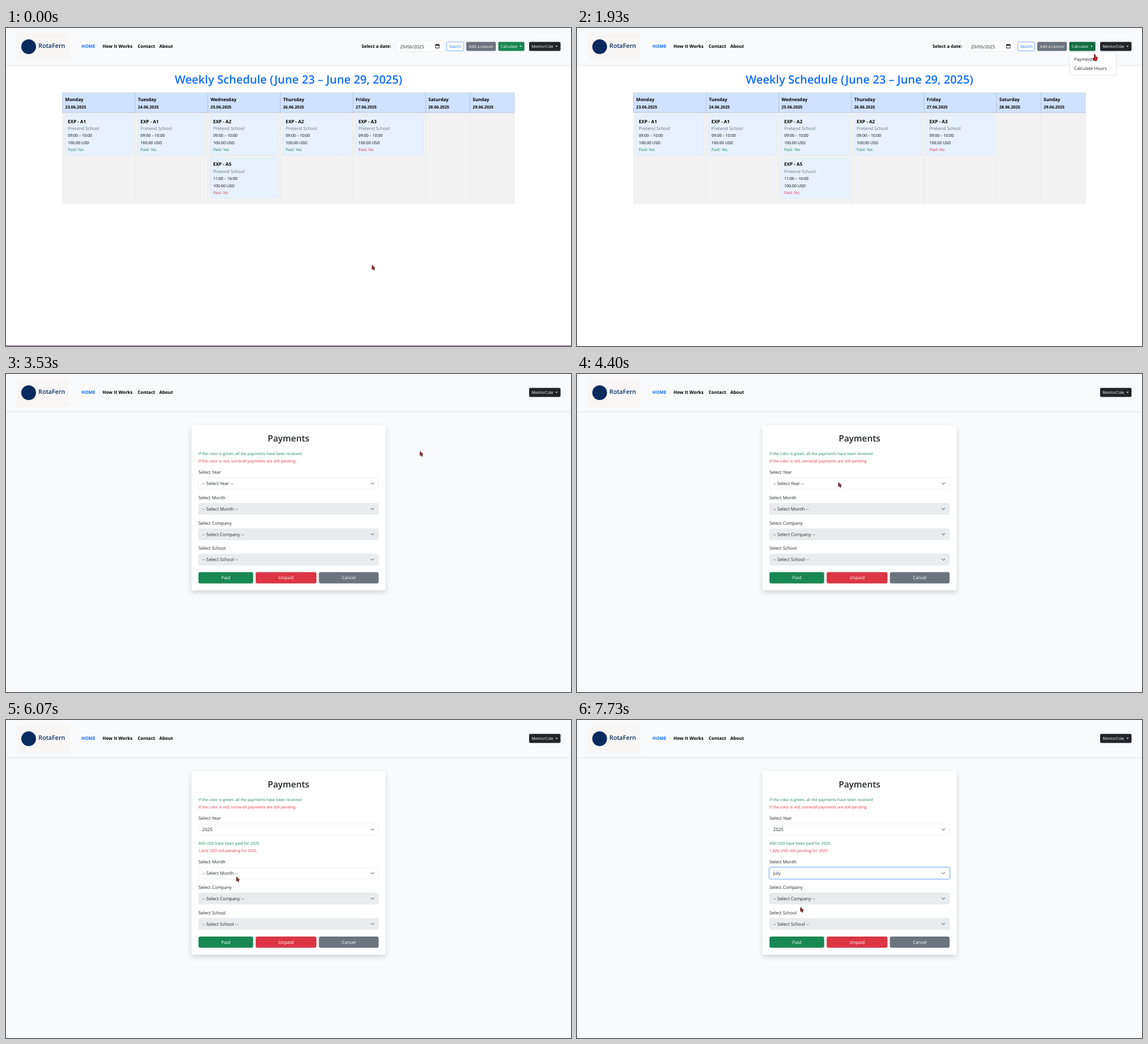
Write an HTML page that moves like this. It is 998x561 px and loops after 8000 ms.

```html
<!DOCTYPE html>
<html lang="en">
<head>
<meta charset="utf-8">
<title>Weekly schedule and payments</title>
<style>
html, body { margin: 0; width: 100%; height: 100%; overflow: hidden; background: #fff; }
svg { display: block; width: 998px; height: 561px; }
text { font-family: "Open Sans", "Noto Sans", sans-serif; text-rendering: geometricPrecision; white-space: pre; }
#bar { filter: drop-shadow(0 1px 1px rgba(0,0,0,.1)); }
.card { filter: drop-shadow(0 4px 4px rgba(0,0,0,.15)); }
</style>
</head>
<body>
<svg id="stage" viewBox="0 0 998 561" xmlns="http://www.w3.org/2000/svg"></svg>
<script>
const LOOP = 8000, ROW = 16.3;
const BLUE = '#0d6efd', GREEN = '#198754', RED = '#dc3545', GREY = '#6c757d', INK = '#212529', LINE = '#dee2e6', PALE = '#f9fafc';
const BODY = 7.87, SMALL = 6.92;

// y is the middle of the capitals
const text = (x, y, s, size = BODY, fill = INK, weight = 400, anchor = 'start', id = '') =>
  `<text ${id && `id="${id}"`} x="${x}" y="${(y + size * .357).toFixed(2)}" font-size="${size}" fill="${fill}" font-weight="${weight}" text-anchor="${anchor}">${s}</text>`;
const box = (x, y, w, h, fill, r = 0, stroke = 'none', extra = '') =>
  `<rect x="${x}" y="${y}" width="${w}" height="${h}" rx="${r}" fill="${fill}" stroke="${stroke}" stroke-width=".55" ${extra}/>`;
const group = (id, inner, attrs = '') => `<g id="${id}" ${attrs}>${inner}</g>`;
const caret = (x, y) => `<path d="M${x - 2} ${y - 1}h4l-2 2z" fill="#fff"/>`;
const navButton = (x, w, fill, id = '') => box(x, 24.4, w, 16.1, fill, 2.2, 'none', id && `id="${id}"`);

function navBar() {
  const links = [['HOME', 133.3, BLUE], ['How It Works', 170.5, '#000'], ['Contact', 232.4, '#000'], ['About', 270.7, '#000']];
  return group('nav',
    group('bar', box(0, 0, 998, 65.5, PALE)) +
    box(19, 8, 93, 50, '#f8f7f5') +
    '<circle cx="40" cy="33" r="13" fill="#0a2a5e"/>' +
    text(57.3, 31, 'RotaFern', 10.7, '#0a2a5e', 600) +
    links.map(([s, x, c]) => text(x, 32.5, s, 7.97, c, 700)).join('') +
    navButton(924, 55.5, INK) +
    text(928.5, 32.7, 'MentorCole', SMALL, '#fff') + caret(972.5, 32.5));
}

function lesson(x, y, code, time, paid) {
  const tx = x + 4.7;
  return box(x, y, 119.3, 71.4, '#e7f1ff', 3, '#d5e0ee') +
    text(tx, y + 11.3, code, 8.15, '#000', 700) +
    text(tx, y + 23.9, 'Pretend School', BODY, GREY) +
    text(tx, y + 36.5, time, 7, '#000') +
    text(tx, y + 49, '100.00 USD', 7.05, '#000') +
    text(tx, y + 61.5, 'Paid: ' + (paid ? 'Yes' : 'No'), 6.9, paid ? GREEN : RED);
}

function homePage() {
  const edges = [99.8, 228.2, 356.5, 484.7, 613, 741.2, 819.5, 898];
  const days = ['Monday', 'Tuesday', 'Wednesday', 'Thursday', 'Friday', 'Saturday', 'Sunday'];
  const codes = ['A1', 'A1', 'A2', 'A2', 'A3'];
  let out = text(499, 91, 'Weekly Schedule (June 23 – June 29, 2025)', 20.1, BLUE, 600, 'middle');
  days.forEach((day, i) => {
    const x = edges[i], w = edges[i + 1] - x;
    out += box(x, 149.2, w, 160.3, '#f2f2f2', 0, LINE) + box(x, 114.7, w, 34.5, '#cfe2ff', 0, '#a6b5cc') +
      text(x + 4.8, 126.2, day, 8, '#000', 700) +
      text(x + 4.8, 139, `${23 + i}.06.2025`, 7.2, '#000', 700);
    if (codes[i]) out += lesson(x + 4.7, 153.3, 'EXP - ' + codes[i], '09:00 – 10:00', i < 4);
  });
  out += lesson(edges[2] + 4.7, 229.2, 'EXP - A5', '11:00 – 16:00', false);

  out += text(628, 32.5, 'Select a date:', 7.85, '#000', 700) +
    box(689.4, 22.7, 84, 19, '#fff', 3, LINE) + text(696, 32.7, '29/06/2025', 8) +
    '<path d="M758.8 29.3h6.4v6h-6.4zM760.3 28v1.5M763.7 28v1.5" fill="none" stroke="#111" stroke-width=".9"/><path d="M758.5 29h7v2h-7z" fill="#111"/>' +
    box(778.4, 24.6, 30.2, 15.8, '#fff', 2.2, BLUE) + text(793.5, 32.7, 'Search', 6.85, BLUE, 400, 'middle') +
    navButton(813, 52.3, GREY) + text(839.2, 32.7, 'Add a Lesson', SMALL, '#fff', 400, 'middle') +
    navButton(869.5, 46.2, GREEN, 'calc') + text(873.8, 32.7, 'Calculate', SMALL, '#fff') + caret(909, 32.5);
  out += group('menu', box(869.8, 42.2, 82.6, 41.4, '#fff', 3, '#ccc') +
    text(878, 55, 'Payments') + text(878, 71.5, 'Calculate Hours'));
  out += group('status', box(0, 547, 89.5, 14, '#2b2a33') + text(5, 554, '127.0.0.1:5000/payments', 6.4, '#fff'));
  return group('home', out + '<path id="edge" d="M0 560.5H998" stroke="#8a5a90"/>');
}

function ring(id, y) {
  return group(id, box(338.9, y - 11, 320.2, 22, 'none', 4, '#c2dbfe', 'style="stroke-width:2.1"') +
    box(340, y - 9.9, 318, 19.8, 'none', 3, '#86b7fe'));
}

function field(name, y, on) {
  const key = name.toLowerCase();
  return text(340, y - 20, 'Select ' + name) +
    box(340, y - 9.9, 318, 19.8, on ? '#fff' : '#e9ecef', 3, LINE, `id="${key}Box"`) +
    (on ? ring(key + 'Ring', y) : '') +
    text(346.6, y + .2, `-- Select ${name} --`, 7.98, INK, 400, 'start', key + 'Value') +
    `<path d="M644.6 ${y - 1.2}l2.6 2.6 2.6-2.6" fill="none" stroke="#343a40" stroke-width="1" stroke-linecap="round" stroke-linejoin="round"/>`;
}

function button(x, w, s, fill) {
  return box(x, 349.6, w, 19.8, fill, 3) + text(x + w / 2, 359.6, s, 7.9, '#fff', 400, 'middle');
}

function payPage() {
  const lower = field('Month', 238, true) + field('Company', 282.7) + field('School', 327.4) +
    button(340, 96.6, 'Paid', GREEN) + button(441, 107.4, 'Unpaid', RED) + button(552.6, 105.6, 'Cancel', GREY);
  return group('pay', box(327.5, 90, 343, 291.6, '#fff', 3, 'none', 'id="card" class="card"') +
    text(499, 113.3, 'Payments', 15.4, INK, 600, 'middle') +
    text(340, 140.5, 'If the color is green, all the payments have been received', 6.9, GREEN) +
    text(340, 153.5, 'If the color is red, some/all payments are still pending', 6.9, RED) +
    field('Year', 193.3, true) +
    group('sums', text(340, 217.3, '400 USD have been paid for 2025', SMALL, GREEN) +
      text(340, 230.3, '1,626 USD still pending for 2025', SMALL, RED)) +
    group('lower', lower));
}

function popup(id, y, items) {
  return group(id, box(340, y, 318, items.length * ROW, '#fff', 0, '#8a8a8a') +
    `<rect id="${id}Mark" x="340.4" width="317.2" height="${ROW}" fill="#1967d2"/>` +
    items.map((s, i) => text(346.6, y + ROW * (i + .5), s, BODY, INK, 400, 'start', id + i)).join(''));
}

const lists = {
  years: { y: 204, items: ['-- Select Year --', '2025', '2026'] },
  months: { y: 280.6, items: ['-- Select Month --', 'May', 'June', 'July', 'August', 'September', 'October'] }
};

const pointer = group('arrow', '<path d="M.6.5v7.4l1.7-1.5 1.3 2.8 1.4-.6-1.3-2.8 2.3-.2z" fill="#d0262c" stroke="#160808" stroke-width=".75" stroke-linejoin="round"/>') +
  group('hand', '<path d="M-.9.6q.9-1.2 1.8 0v3.6l3 .7q.9.3.8 1.3l-.6 3.4-.9 1.8h-4l-2.6-3.5q-.4-1.2.9-1l1.6 1z" fill="#d3262b" stroke="#160808" stroke-width=".8" stroke-linejoin="round"/>');

const stage = document.getElementById('stage');
stage.innerHTML = box(0, 0, 998, 561, '#fff', 0, 'none', 'id="paper"') + navBar() + homePage() + payPage() +
  Object.entries(lists).map(([id, l]) => popup(id, l.y, l.items)).join('') + group('cursor', pointer);

const el = {};
stage.querySelectorAll('[id]').forEach(n => el[n.id] = n);
const show = (id, on) => el[id].style.display = on ? '' : 'none';
const put = (id, x, y) => el[id].setAttribute('transform', `translate(${x} ${y})`);
const between = (t, a, b) => t >= a && t < b;

// rows: time, then values, joined by straight lines
function track(rows, t) {
  let i = 0;
  while (i < rows.length - 1 && rows[i + 1][0] <= t) i++;
  const a = rows[i], b = rows[Math.min(i + 1, rows.length - 1)];
  const k = b === a ? 0 : Math.max(0, (t - a[0]) / (b[0] - a[0]));
  return a.slice(1).map((v, j) => v + (b[j + 1] - v) * k);
}

const PATH = [
  [0, 646, 418], [480, 646, 418], [600, 760, 240], [730, 901, 0], [800, 903, -14], [1000, 906, -14],
  [1250, 907, 24], [1670, 909, 33], [1930, 914.5, 46.3], [2330, 911, 53], [3010, 911, 53],
  [3530, 731.5, 136], [3870, 500, 186], [4070, 463, 192], [4670, 460, 190], [4810, 460, 190],
  [4870, 455.7, 224], [5560, 455.7, 224], [6070, 406.5, 276.3], [6270, 406, 274], [6540, 406, 274],
  [7470, 394.2, 330]
];
const STATUS = [[2000, 0], [2130, 1], [2470, 1], [2670, .035], [2870, .035]];
const MENU = [[1700, 0], [1730, 1], [2470, 1], [2560, 0]];

function list(id, open, cy) {
  show(id, open);
  if (!open) return;
  const { y, items } = lists[id];
  const row = Math.max(0, Math.min(items.length - 1, Math.floor((cy - y) / ROW)));
  el[id + 'Mark'].setAttribute('y', y + row * ROW);
  items.forEach((_, i) => el[id + i].setAttribute('fill', i === row ? '#fff' : INK));
}

function draw(t) {
  const [cx, cy] = track(PATH, t);
  const home = t < 2870;
  const loaded = t >= 5600;
  const blank = between(t, 2870, 3070) || between(t, 5400, 5600);

  el.paper.setAttribute('fill', home ? '#fff' : PALE);
  show('nav', !blank);
  show('home', home);
  show('pay', !home && !blank);
  show('edge', t < 870);
  el.menu.style.opacity = track(MENU, t)[0];
  el.status.style.opacity = track(STATUS, t)[0];
  el.calc.setAttribute('fill', between(t, 1670, 2500) ? '#146c43' : between(t, 1250, 1670) ? '#157347' : GREEN);

  const k = Math.min(1, Math.max(0, (t - (loaded ? 5600 : 3070)) / 400));
  const rise = 1 - (1 - k) ** 2;
  el.pay.style.opacity = rise;
  put('pay', 0, 10 * (1 - rise));

  const gap = loaded ? 32.3 : 0;
  show('sums', loaded);
  put('lower', 0, gap);
  el.card.setAttribute('height', 291.6 + gap);
  el.monthBox.setAttribute('fill', loaded ? '#fff' : '#e9ecef');
  show('yearRing', between(t, 4600, 5400));
  show('monthRing', t >= 6200);
  el.yearValue.textContent = t >= 5270 ? '2025' : '-- Select Year --';
  el.monthValue.textContent = t >= 7730 ? 'July' : '-- Select Month --';
  list('years', between(t, 4670, 5270), cy);
  list('months', between(t, 6270, 7730), cy);

  const hand = between(t, 1250, 2500);
  show('hand', hand);
  show('arrow', !hand);
  put('cursor', cx, cy);
}

const start = performance.now();
function tick() {
  draw((performance.now() - start) % LOOP);
  requestAnimationFrame(tick);
}
tick();
</script>
</body>
</html>
```
